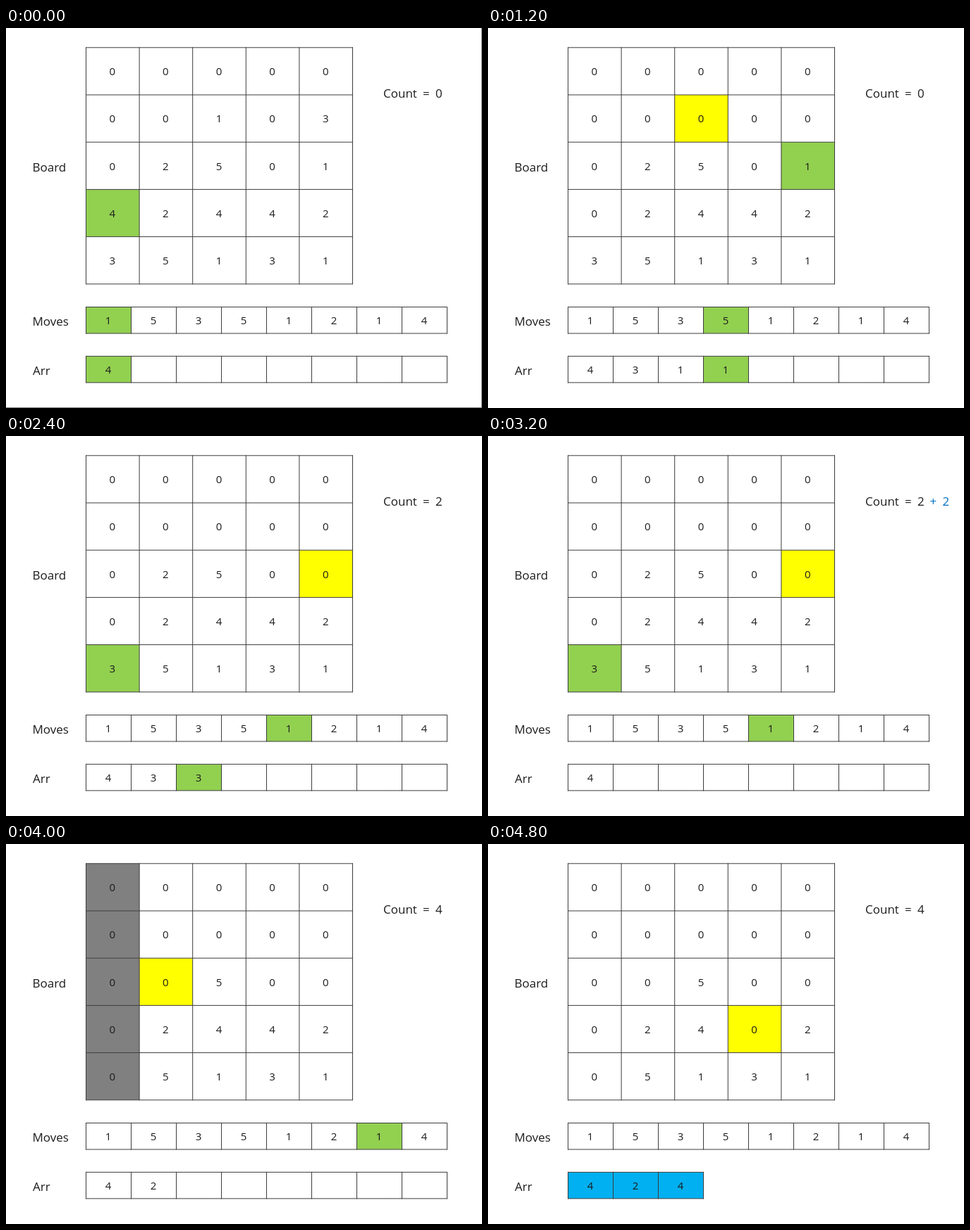
An HTML page with a canvas for the animation above (6000 ms loop, 675 px wide and 540 px high).

```html
<!DOCTYPE html>
<html lang="en">
<head>
<meta charset="utf-8">
<title>Board, moves and stack</title>
<style>
html, body { margin: 0; width: 100%; height: 100%; overflow: hidden; background: #fff; }
canvas { display: block; }
</style>
</head>
<body>
<canvas id="stage" width="675" height="540"></canvas>
<script>
const ctx = document.getElementById('stage').getContext('2d');
const STEP = 400, LOOP = 6000;
const GREEN = '#92d050', YELLOW = '#ffff00', GRAY = '#808080', BLUE = '#00b0f0';
const INK = '#1c1c1c', LINE = '#3c3c3c';
const FONT = '"Open Sans", "Noto Sans", sans-serif';
const MOVES = [1, 5, 3, 5, 1, 2, 1, 4];
const START = ['00000', '00103', '02501', '42442', '35131'];

// Plays the whole game once and records every step to show.
function buildScenes() {
  const board = START.map(row => [...row].map(Number));
  const stack = [], scenes = [];
  let count = 0, emptied = null;

  MOVES.forEach((column, move) => {
    const col = column - 1;
    const row = board.findIndex(cells => cells[col] > 0);
    const record = extra => scenes.push({
      board: board.map(cells => [...cells]), stack: [...stack],
      move, count, emptied, slots: 8, marked: [], ...extra
    });

    if (row < 0) {
      record({ emptyColumn: col });
      emptied = null;
      return;
    }
    const value = board[row][col], picked = { row, col };
    stack.push(value);
    const top = stack.length - 1;
    record({ picked, marked: [top], mark: GREEN });
    if (stack[top - 1] === value) {
      record({ picked, marked: [top - 1, top], mark: BLUE });
      stack.splice(-2);
      record({ picked, bonus: true });
      count += 2;
    }
    board[row][col] = 0;
    emptied = picked;
  });

  scenes.push({ board, stack, count, emptied, move: -1, slots: stack.length,
                marked: [...stack.keys()], mark: BLUE });
  return scenes;
}

function text(value, x, baseline, size, align = 'left', color = INK) {
  ctx.font = `${size}px ${FONT}`;
  ctx.textAlign = align;
  ctx.fillStyle = color;
  ctx.fillText(value, x, baseline);
}

const label = (value, x, y, color) => text(value, x, y + 6.5, 17, 'left', color);

function line(x1, y1, x2, y2) {
  ctx.beginPath();
  ctx.moveTo(x1, y1);
  ctx.lineTo(x2, y2);
  ctx.stroke();
}

function grid(x, y, cols, rows, w, h, valueAt, colorAt) {
  const right = x + cols * w, bottom = y + rows * h;
  for (let r = 0; r < rows; r++) {
    for (let c = 0; c < cols; c++) {
      const color = colorAt(c, r);
      if (color) {
        ctx.fillStyle = color;
        ctx.fillRect(x + c * w, y + r * h, w, h);
      }
      text(valueAt(c, r) ?? '', x + (c + 0.5) * w - 0.5, y + (r + 0.5) * h + 5.8, 15, 'center');
    }
  }
  ctx.strokeStyle = LINE;
  ctx.lineWidth = 1;
  for (let c = 0; c <= cols; c++) line(x + c * w, y - 0.5, x + c * w, bottom + 0.5);
  for (let r = 0; r <= rows; r++) line(x - 0.5, y + r * h, right + 0.5, y + r * h);
}

const isAt = (cell, c, r) => cell && cell.col === c && cell.row === r;

function draw(scene, framed) {
  ctx.fillStyle = '#fff';
  ctx.fillRect(0, 0, 675, 540);

  label('Board', 37.4, 197);
  label('Moves', 37.4, 416);
  label('Arr', 38, 486);
  label('Count', 535, 92);
  label('=', 591, 92);
  label(scene.count, 609, 92);
  if (scene.bonus) {
    label('+', 626.5, 92, '#0070c0');
    label('2', 644.5, 92, '#0070c0');
  }

  grid(113.5, 27.8, 5, 5, 75.6, 67.2, (c, r) => scene.board[r][c], (c, r) =>
    isAt(scene.picked, c, r) ? GREEN :
    isAt(scene.emptied, c, r) ? YELLOW :
    scene.emptyColumn === c ? GRAY : null);
  grid(113.5, 396.5, 8, 1, 64, 37.5, c => MOVES[c], c => c === scene.move ? GREEN : null);
  grid(113.5, 466.4, scene.slots, 1, 64, 37.5, c => scene.stack[c],
    c => scene.marked.includes(c) ? scene.mark : null);

  if (framed) {
    ctx.fillStyle = '#7f7f7f';
    ctx.fillRect(674, 0, 1, 540);
    ctx.fillRect(0, 539, 675, 1);
  }
}

const scenes = buildScenes();

function tick() {
  const index = Math.min(Math.floor(performance.now() % LOOP / STEP), scenes.length - 1);
  draw(scenes[index], index < 2);
  requestAnimationFrame(tick);
}
tick();
</script>
</body>
</html>
```
